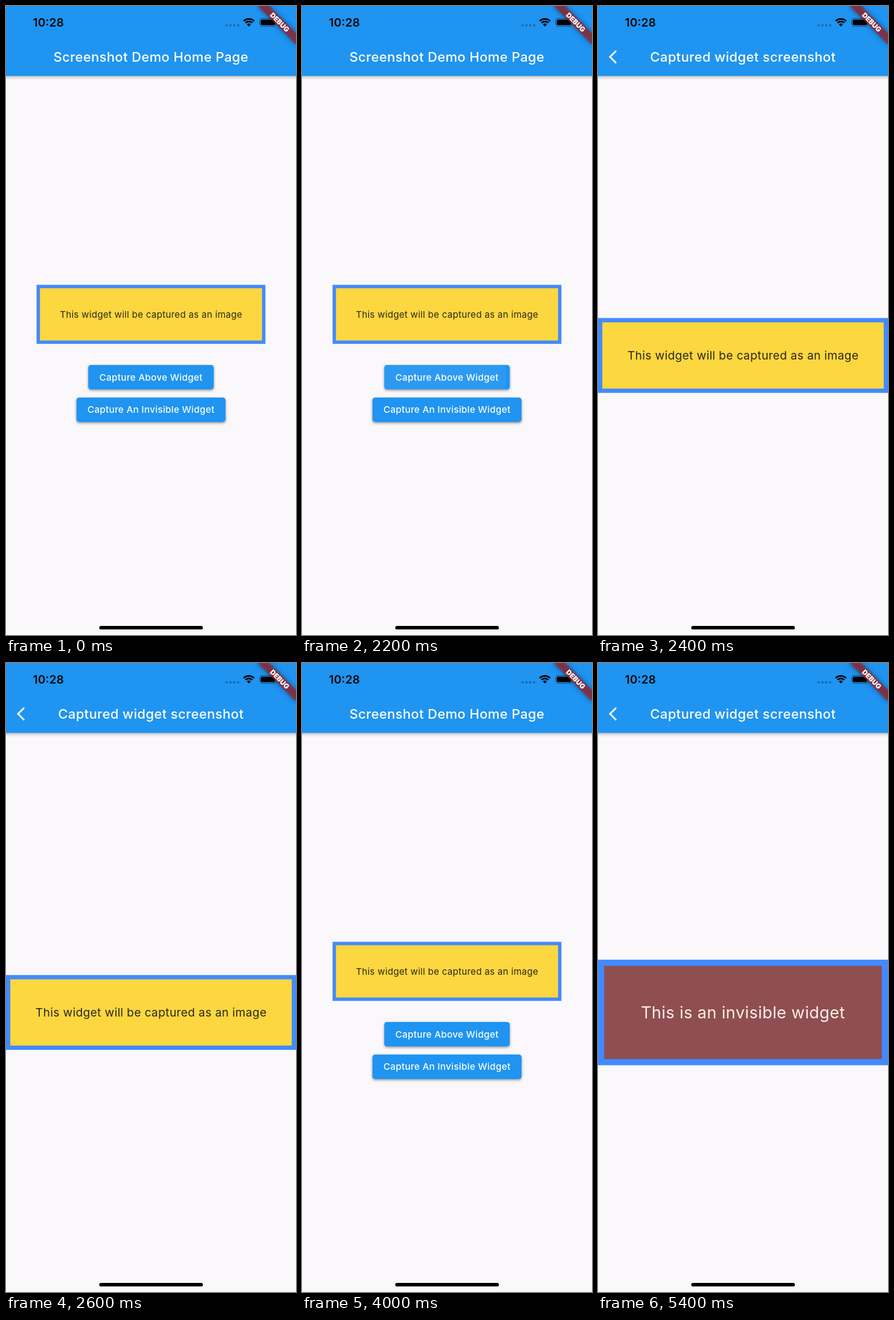
An HTML page with a canvas that plays this animation: 480 by 1039 pixels, repeating every 8000 ms.

```html
<!DOCTYPE html>
<html lang="en">
<head>
<meta charset="utf-8">
<title>Screenshot demo</title>
<style>
html, body { margin: 0; width: 100%; height: 100%; overflow: hidden; background: #faf8fa; }
canvas { display: block; width: 480px; height: 1039px; }
</style>
</head>
<body>
<canvas id="stage" width="480" height="1039"></canvas>
<script>
const W = 480, H = 1039, LOOP = 8000, STEP = 100, FADE = 150;
const U = W / 428; // one logical screen unit
const BLUE = '#1f94f1', ACCENT = '#448aff', AMBER = '#fdd73f', PAPER = '#faf8fa';
const BAR = 103 * U, MIDDLE = (BAR + H) / 2;
const CARD = { x: 50.6, y: 460.6, w: 378.8, h: 87 * U };
const BUTTONS = [
  { label: 'Capture Above Widget', x: 136.2, y: 592.9, w: 207.6, h: 36 * U },
  { label: 'Capture An Invisible Widget', x: 116.6, y: 646.8, w: 246.8, h: 36 * U }
];
const DIALOGS = [
  { open: 2240, close: 3750, card: drawLargeCard },
  { open: 5140, close: Infinity, card: drawHiddenCard }
];
const TAPS = [
  { at: 2100, button: 0, x: 235 },
  { at: 5000, button: 1, x: 240 }
];
const CHEVRON = new Path2D('M11.67 3.87 L9.9 2.1 0 12 9.9 21.9 11.67 20.13 3.54 12z');

const ctx = document.getElementById('stage').getContext('2d');
const layer = document.createElement('canvas');
layer.width = W;
layer.height = H;
const layerCtx = layer.getContext('2d');

const clamp = v => Math.max(0, Math.min(1, v));

function bezier(x1, y1, x2, y2) {
  const at = (a, b, s) => 3 * a * s * (1 - s) ** 2 + 3 * b * s * s * (1 - s) + s ** 3;
  return x => {
    let lo = 0, hi = 1;
    for (let i = 0; i < 24; i++) {
      const mid = (lo + hi) / 2;
      if (at(x1, x2, mid) < x) lo = mid; else hi = mid;
    }
    return at(y1, y2, (lo + hi) / 2);
  };
}
const ease = bezier(0.25, 0.1, 0.25, 1);
const easeOut = bezier(0, 0, 0.58, 1);

function text(c, str, x, y, size, weight, color, spacing = 0) {
  c.font = `${weight} ${size}px Inter, "Open Sans", sans-serif`;
  c.letterSpacing = `${spacing}px`;
  c.textAlign = 'center';
  c.fillStyle = color;
  c.fillText(str, x, y);
}

function rounded(c, x, y, w, h, r) {
  c.beginPath();
  c.roundRect(x, y, w, h, r);
}

function disc(c, x, y, r, color) {
  c.beginPath();
  c.arc(x, y, r, 0, Math.PI * 2);
  c.fillStyle = color;
  c.fill();
}

function withShadow(c, blur, dy, alpha, draw) {
  c.save();
  c.shadowColor = `rgba(0,0,0,${alpha})`;
  c.shadowBlur = blur;
  c.shadowOffsetY = dy;
  draw();
  c.restore();
}

function framed(c, x, y, w, h, line, fill) {
  c.fillStyle = ACCENT;
  c.fillRect(x, y, w, h);
  c.fillStyle = fill;
  c.fillRect(x + line, y + line, w - 2 * line, h - 2 * line);
}

function drawPage(c, title) {
  c.fillStyle = PAPER;
  c.fillRect(0, 0, W, H);
  withShadow(c, 6, 1.5, 0.32, () => {
    c.fillStyle = BLUE;
    c.fillRect(-10, -10, W + 20, BAR + 10);
  });
  text(c, title, 239.9, 92, 22, 500, '#fff', 0.34);
}

function drawCard(c) {
  framed(c, CARD.x, CARD.y, CARD.w, CARD.h, 5 * U, AMBER);
  text(c, 'This widget will be captured as an image', 240.1, 514.9, 15.1, 400, '#2b2618', 0.28);
}

function drawLargeCard(c) {
  const k = W / CARD.w;
  c.save();
  c.translate(0, MIDDLE - CARD.h * k / 2);
  c.scale(k, k);
  c.translate(-CARD.x, -CARD.y);
  drawCard(c);
  c.restore();
}

function drawHiddenCard(c) {
  framed(c, 0, MIDDLE - 87.2, W, 174.4, 10.2, '#8f4f50');
  text(c, 'This is an invisible widget', 240, 587, 27.1, 400, '#fbefec', 0.4);
}

function drawTap(c, t, tap) {
  const age = t - tap.at;
  if (age < 0 || age > 250) return;
  const b = BUTTONS[tap.button];
  c.save();
  rounded(c, b.x, b.y, b.w, b.h, 4 * U);
  c.clip();
  disc(c, tap.x, b.y + b.h / 2, 33 + age * 0.7, `rgba(255,255,255,${0.07 - age * 0.0001})`);
  c.restore();
}

function drawHome(c, t) {
  drawPage(c, 'Screenshot Demo Home Page');
  drawCard(c);
  for (const b of BUTTONS) {
    withShadow(c, 4, 1.8, 0.4, () => {
      rounded(c, b.x, b.y, b.w, b.h, 4 * U);
      c.fillStyle = BLUE;
      c.fill();
    });
  }
  TAPS.forEach(tap => drawTap(c, t, tap));
  for (const b of BUTTONS) text(c, b.label, b.x + b.w / 2, b.y + 25.6, 15.2, 500, '#fff', 0.32);
}

function drawDialog(c, d, t) {
  drawPage(c, 'Captured widget screenshot');
  if (t >= d.close) disc(c, 34.8, 80.3, 35.3, 'rgba(200,200,200,0.32)');
  c.save();
  c.translate(16 * U, 63 * U);
  c.scale(U, U);
  c.fillStyle = '#fff';
  c.fill(CHEVRON);
  c.restore();
  d.card(c);
}

function drawStatus(c) {
  text(c, '10:28', 70.1, 34.2, 19.2, 600, '#03080d');
  for (let i = 0; i < 4; i++) disc(c, 365.3 + i * 6.3, 32, 2.1, 'rgba(0,20,50,0.3)');

  // Wi-Fi fan
  c.strokeStyle = '#000';
  c.lineWidth = 2.6;
  const from = -Math.PI * 0.75, to = -Math.PI * 0.25;
  for (const r of [12.2, 8]) {
    c.beginPath();
    c.arc(402, 33.6, r, from, to);
    c.stroke();
  }
  c.beginPath();
  c.moveTo(402, 34);
  c.arc(402, 33.6, 4.6, from, to);
  c.closePath();
  c.fillStyle = '#000';
  c.fill();

  // Battery
  rounded(c, 419.6, 20.6, 27.6, 13, 4);
  c.strokeStyle = 'rgba(0,0,0,0.4)';
  c.lineWidth = 1.2;
  c.stroke();
  rounded(c, 421.5, 22.4, 23.8, 9.4, 2.4);
  c.fill();
  rounded(c, 448.8, 25, 1.6, 4.4, 1);
  c.fillStyle = 'rgba(0,0,0,0.4)';
  c.fill();

  rounded(c, 154.3, 1024, 171.6, 5.8, 2.9);
  c.fillStyle = '#000';
  c.fill();
}

function drawBanner(c) {
  const strip = [-40 * U, 28 * U, 80 * U, 12 * U];
  c.save();
  c.translate(W, 0);
  c.rotate(Math.PI / 4);
  c.filter = 'blur(4px)';
  c.fillStyle = 'rgba(0,0,0,0.45)';
  c.fillRect(...strip);
  c.filter = 'none';
  c.fillStyle = 'rgba(183,28,28,0.63)';
  c.fillRect(...strip);
  text(c, 'DEBUG', 0, 42.2, 11.4, 900, '#fff');
  c.restore();
}

function render(t) {
  drawHome(ctx, t);
  for (const d of DIALOGS) {
    const p = t < d.close ? clamp((t - d.open) / FADE) : clamp(1 - (t - d.close) / FADE);
    if (p === 0) continue;
    ctx.fillStyle = `rgba(0,0,0,${0.54 * ease(p)})`;
    ctx.fillRect(0, 0, W, H);
    drawDialog(layerCtx, d, t);
    ctx.globalAlpha = easeOut(p);
    ctx.drawImage(layer, 0, 0);
    ctx.globalAlpha = 1;
  }
  drawStatus(ctx);
  drawBanner(ctx);
}

const start = performance.now();
let shown = -1;
function tick() {
  const t = (performance.now() - start) % LOOP;
  const step = Math.floor(t / STEP);
  if (step !== shown) {
    shown = step;
    render(step * STEP);
  }
  requestAnimationFrame(tick);
}
tick();
</script>
</body>
</html>
```
